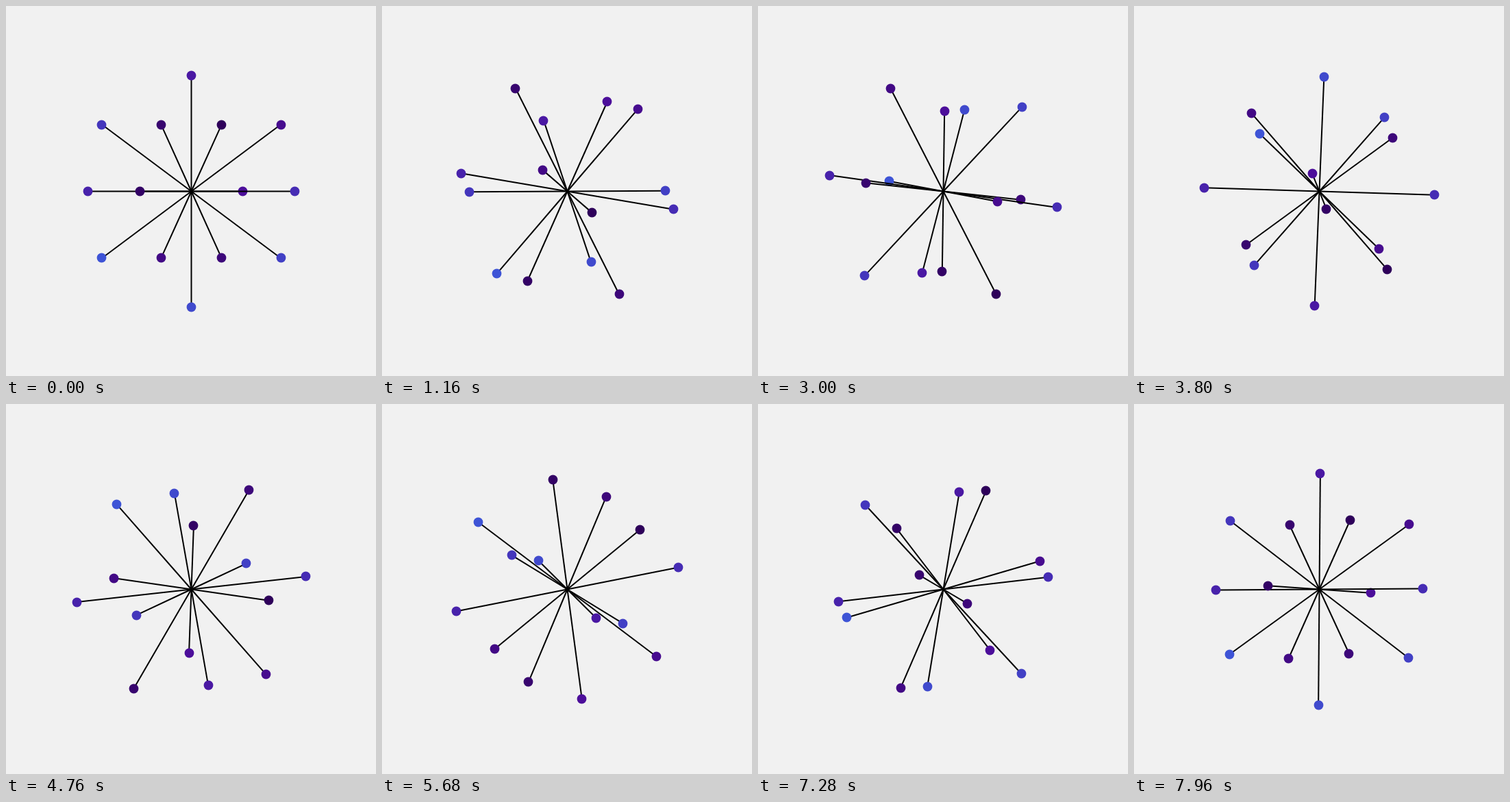
Recreate the animation shown at these times as an HTML page with a canvas. Size 540 px wide and 540 px high, loop 8000 ms.

```html
<!DOCTYPE html>
<html>
<head>
<meta charset="utf-8">
<style>
  html, body { margin: 0; height: 100%; overflow: hidden; background: #f1f1f1; }
  canvas { display: block; }
</style>
</head>
<body>
<canvas id="stage" width="540" height="540"></canvas>
<script>
const ctx = document.getElementById('stage').getContext('2d');
const LOOP = 8000, STEP = 40, CENTER = 270.5, RADIUS = 168.75, DOT = 6.9;
const TILT = Math.atan(0.2), VIEW = Math.PI / 12;
const DARK = [46, 0, 90], PURPLE = [76, 14, 154], BLUE = [62, 84, 214];

const cube = [];
for (const side of [-1, 1])
  for (const y of [1, -1])
    for (const x of [1, -1]) cube.push([x, y, x * side]);

// Colour order: o is the next cube corner, a letter an axis tip (capital: negative)
const corners = [...'oZoooozyXxooYo'].map(key => key === 'o'
  ? cube.shift()
  : [...'xyz'].map(axis => (axis === key) - (axis.toUpperCase() === key)));

const mix = (a, b, f) => `rgb(${a.map((c, n) => Math.round(c + (b[n] - c) * f))})`;
const ramp = i => i < 6 ? mix(DARK, PURPLE, i / 6) : mix(PURPLE, BLUE, (i - 6) / 7);

function turn(a, b, angle) {
  const c = Math.cos(angle), s = Math.sin(angle);
  return [a * c + b * s, b * c - a * s];
}

const points = corners.map((corner, i) => {
  const [px, py, pz] = corner.map(v => v * RADIUS / Math.hypot(...corner));
  const [x, z] = turn(px, pz, TILT);
  return { x, y: py, z, color: ramp(i) };
});

function project(p, angle) {
  const [y, depth] = turn(p.y, p.z, angle);
  const [x, z] = turn(p.x, depth, VIEW);
  return { x, y: -y, z, color: p.color };
}

function draw(now) {
  const time = Math.floor((now % LOOP) / STEP) * STEP;
  const angle = time / LOOP * 2 * Math.PI;
  ctx.setTransform(1, 0, 0, 1, CENTER, CENTER);
  ctx.clearRect(-CENTER, -CENTER, 540, 540);
  ctx.lineWidth = 2;
  // Far points first; dots sit on whole pixels
  for (const p of points.map(q => project(q, angle)).sort((a, b) => b.z - a.z)) {
    ctx.beginPath();
    ctx.moveTo(0, 0);
    ctx.lineTo(p.x, p.y);
    ctx.stroke();
    ctx.beginPath();
    ctx.arc(Math.round(p.x), Math.round(p.y), DOT, 0, 2 * Math.PI);
    ctx.fillStyle = p.color;
    ctx.fill();
  }
}

const start = performance.now();
function tick() {
  draw(performance.now() - start);
  requestAnimationFrame(tick);
}
tick();
</script>
</body>
</html>
```
